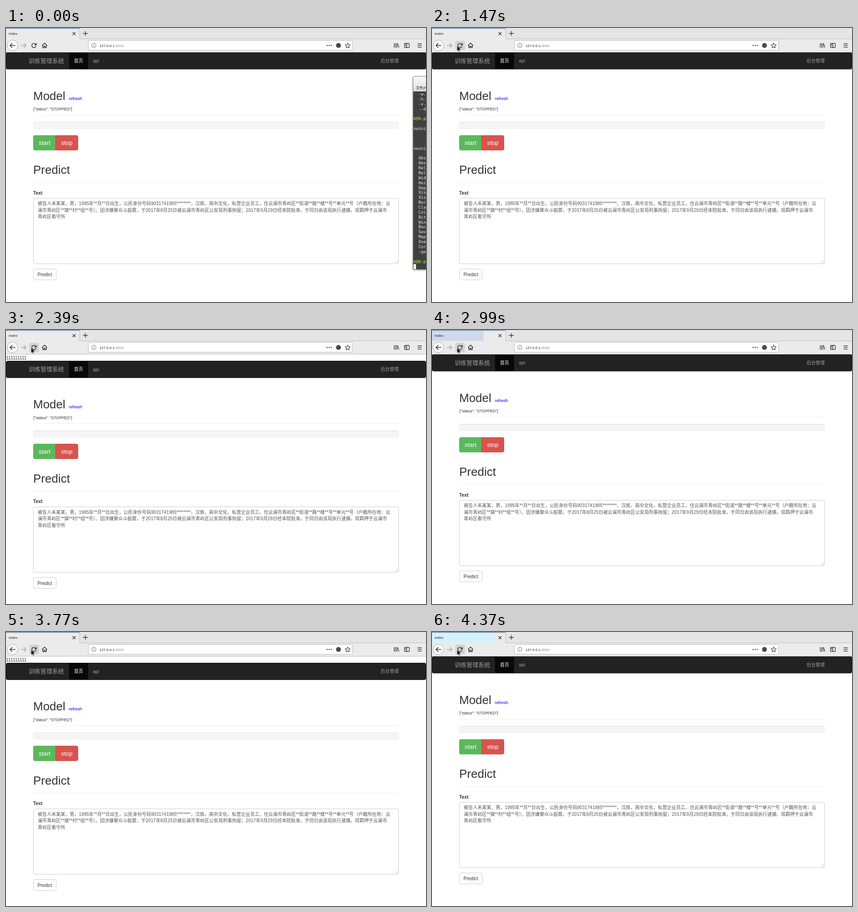
Write an HTML page that moves like this. It is 926x605 px and loops after 4.39 s.

```html
<!DOCTYPE html>
<html lang="zh">
<head>
<meta charset="utf-8">
<title>index</title>
<style>
html, body { margin: 0; width: 100%; height: 100%; overflow: hidden; background: #fff; }
svg { display: block; width: 926px; height: 605px; }
text { font-family: "Liberation Sans", "Noto Sans CJK TC", "Noto Sans CJK SC", "Noto Sans CJK", sans-serif; font-size: 10.3px; fill: #333; white-space: pre; }
.icon { fill: none; stroke: #333; stroke-width: 1.3; }
.tiny { font-size: 8px; fill: #222; }
.big { font-size: 26px; }
.nav { fill: #9d9d9d; font-size: 10px; }
.btn { fill: #fff; font-size: 13.3px; }
.body { font-size: 10.08px; fill: #555; }
.rule { fill: #eee; }
.field { fill: #fff; stroke: #ccc; }
.mono text { font: 9.05px "DejaVu Sans Mono", monospace; fill: #eee; }
.mono .prompt { fill: #9cc43c; font-weight: bold; }

#page, #terminal, #hover { animation: 4390ms step-end infinite; }
#page { animation-name: shift; }
#terminal { animation-name: vanish; }
#hover { animation-name: press; fill: transparent; }
#burst, #pointer { animation: 4390ms linear infinite; }
#burst { animation-name: burst; }
#pointer { animation-name: travel; }

@keyframes shift {
  0%, 60.4%, 86.1% { transform: none; }
  38.7%, 74.3% { transform: translateY(14.5px); }
}
@keyframes vanish { 0% { opacity: 1; } 24.4%, 100% { opacity: 0; } }
@keyframes press {
  0% { fill: transparent; }
  20.05%, 26.2%, 53.5%, 70.9%, 82.9%, 95% { fill: #d2d2d2; }
  24.4%, 51.7%, 69%, 81.1%, 94.08% { fill: #c2c2c2; }
  100% { fill: #d2d2d2; }
}
/* A wash fills the tab after each load, then fades. */
@keyframes burst {
  0%, 41.2%, 48.51%, 64.46%, 72.91%, 76.5%, 83.81%, 88.8%, 93.41%, 96.4% { width: 0; opacity: 1; fill: #ced9e9; }
  68.1%, 69% { width: 113px; opacity: 1; fill: #ced9e9; }
  43.96%, 44.9%, 70.8%, 79.27%, 80.2%, 91.1%, 99.3%, 100% { width: 135px; opacity: 1; fill: #d4f2fd; }
  48.5%, 72.9%, 83.8%, 93.4% { width: 135px; opacity: 0; fill: #d4f2fd; }
}
@keyframes travel {
  0%, 7.51% { transform: translate(3px, 157px); opacity: 0; }
  7.52% { transform: translate(3px, 157px); opacity: 1; }
  10% { transform: translate(62px, 140px); }
  12.5% { transform: translate(112px, 113px); }
  14% { transform: translate(124px, 94px); }
  16% { transform: translate(94px, 65px); }
  18.9% { transform: translate(62px, 47px); }
  20.05%, 100% { transform: translate(55.5px, 39.5px); opacity: 1; }
}
</style>
</head>
<body>
<svg viewBox="0 0 926 605">
  <defs>
    <linearGradient id="bar" x2="0" y2="1">
      <stop stop-color="#fafafa"/><stop offset="1" stop-color="#dcdcdc"/>
    </linearGradient>
    <linearGradient id="inset" x2="0" y2="1">
      <stop stop-color="#e6e6e6"/><stop offset=".16" stop-color="#f5f5f5"/>
    </linearGradient>
    <filter id="shadow" x="-40%" width="180%"><feDropShadow dx="0" dy="1" stdDeviation="2.2" flood-opacity=".55"/></filter>
  </defs>
  <rect width="926" height="605" fill="#fff"/>

  <g id="page">
    <text x="0" y="50" font-size="10.4">111111111</text>
    <rect x=".5" y="54" width="925" height="36.8" rx="3" fill="#222" stroke="#080808"/>
    <rect x="139" y="54.5" width="42" height="36" fill="#080808"/>
    <text class="nav" x="50" y="76.5" style="font-size:13px">训练管理系统</text>
    <text class="nav" x="150" y="75.8" style="fill:#fff">首页</text>
    <text class="nav" x="191.5" y="76" style="font-size:10.3px">api</text>
    <text class="nav" x="826" y="75.8">后台管理</text>

    <text class="big" x="60" y="158.5">Model</text>
    <text x="138.3" y="158.5" style="font-size:9.5px;fill:#00e">refresh</text>
    <text x="60" y="182.3" style="font-size:8.55px">{"status": "STOPPED"}</text>
    <rect class="rule" x="60" y="192" width="806" height="1"/>
    <rect x="60.3" y="207.8" width="805.4" height="14.4" rx="2.5" fill="url(#inset)" stroke="#e9e9e9" stroke-width=".7"/>

    <path d="M109.5 237.3H63.5q-3 0-3 3v26.4q0 3 3 3h46z" fill="#5cb85c" stroke="#4cae4c"/>
    <path d="M109.5 237.3h46q3 0 3 3v26.4q0 3-3 3h-46z" fill="#d9534f" stroke="#d43f3a"/>
    <text class="btn" x="72" y="258">start</text>
    <text class="btn" x="121.5" y="258">stop</text>

    <text class="big" x="60" y="322">Predict</text>
    <rect class="rule" x="60" y="341" width="806" height="1"/>
    <text x="60" y="367.5" font-weight="bold">Text</text>
    <rect class="field" x="60.5" y="376" width="805" height="144.5" rx="3"/>
    <g class="lines">
      <text class="body" x="70" y="391.2">被告人禾某某，男，1985年**月**日出生，公民身份号码9031741985********，汉族，高中文化，私营企业员工，住云澜市青屿区**街道**路**楼**号**单元**号（户籍所在地：云</text>
      <text class="body" x="70" y="405.7">澜市青屿区**镇**村**组**号）。因涉嫌聚众斗殴罪，于2017年8月25日被云澜市青屿区公安局刑事拘留；2017年9月29日经本院批准，于同日由该局执行逮捕，现羁押于云澜市</text>
      <text class="body" x="70" y="420.2">青屿区看守所</text>
    </g>
    <path d="M858 519l6-6M861.5 519l2.5-2.5" stroke="#aaa" stroke-width=".8"/>
    <rect class="field" x="60.5" y="532" width="50" height="24" rx="3"/>
    <text x="69.5" y="548">Predict</text>
  </g>

  <g id="terminal">
    <path d="M897.5 533V111q0-4 4-4H940v426z" fill="#3f3f3f" filter="url(#shadow)"/>
    <path d="M897.5 140V111q0-4 4-4H940v33z" fill="url(#bar)"/>
    <path d="M897.5 533V111q0-4 4-4H940M897.5 533H940" fill="none" stroke="#777" stroke-width=".8"/>
    <text class="tiny" x="904" y="135" style="font-size:7.6px">文件(F)</text>
    <g class="mono" id="log"></g>
    <rect x="898.5" y="521.5" width="5.5" height="11" fill="#fff"/>
  </g>

  <g id="chrome">
    <rect width="926" height="53.5" fill="#ebebeb"/>
    <rect x="162" width="764" height="24" fill="#e5e5e5"/>
    <rect id="burst" y="1.5" width="0" height="22.5"/>
    <rect width="162" height="1.6" fill="#7890b0"/>
    <path d="M162.5 0V24H926M0 53.5H926" fill="none" stroke="#bdbdbd"/>
    <text class="tiny" x="6" y="15">index</text>
    <path class="icon" d="M146.8 9.2l6.6 6.6m0-6.6l-6.6 6.6M169.8 12h10.4M175 6.8v10.4"/>

    <circle cx="14.3" cy="38.5" r="11.7" fill="#fafafa" stroke="#aaa"/>
    <path class="icon" d="M20.5 38.5H9M13.8 33.5l-5 5 5 5" style="stroke-width:1.6"/>
    <path class="icon" d="M33 38.5H44M39.3 33.5l5 5-5 5" style="stroke:#a5a5a5"/>
    <rect id="hover" x="51.5" y="28.5" width="21" height="20.5" rx="2"/>
    <path class="icon" d="M65.2 35.6A4.7 4.7 0 1 0 66 40.3" style="stroke-width:1.6"/>
    <path d="M67.6 33v5.2h-5.2z" fill="#333"/>
    <path class="icon" d="M79.3 38.8L85 33.3l5.7 5.5M81.2 38v5.4h2.6v-3.2h2.4v3.2h2.6V38" style="stroke-width:1.5"/>

    <rect x="181.5" y="27.5" width="582.5" height="21.5" rx="1.5" fill="#fff" stroke="#bbb"/>
    <circle class="icon" cx="193.7" cy="38.5" r="4.8" style="stroke:#666;stroke-width:1"/>
    <path d="M193.7 37.8v3.2M193.7 35.7v1.1" stroke="#666" stroke-width="1.1"/>
    <text class="tiny" x="206" y="41.5">127.0.0.1<tspan fill="#8a8a8a">:9000</tspan></text>
    <g fill="#4a4a4a">
      <circle cx="708" cy="38.6" r="1.4"/><circle cx="712.6" cy="38.6" r="1.4"/><circle cx="717.2" cy="38.6" r="1.4"/>
      <circle cx="733" cy="38.5" r="5.4"/>
    </g>
    <path class="icon" d="M753.3 33.2l1.7 3.5 3.8.5-2.8 2.7.7 3.8-3.4-1.8-3.4 1.8.7-3.8-2.8-2.7 3.8-.5z" style="stroke-width:1.1"/>
    <path class="icon" d="M856 33.5v10M859 33.5v10M862 33.5v10M863.4 34l3 9.3"/>
    <rect class="icon" x="878.6" y="34" width="10.6" height="9" rx="1.3"/>
    <path class="icon" d="M883.5 34v9M880 36.5h2M880 38.6h2M907.5 35h9M907.5 38.7h9M907.5 42.4h9"/>
  </g>

  <path id="pointer" d="M0 0V11.5L2.7 9l1.8 4.1 2-.9-1.8-3.9H8.4z" stroke="#fff" stroke-width=".6"/>
</svg>
<script>
const log = document.getElementById("log");
const fields = "Abs Abs Rel Rel Wid Hei Dep Vis Vis Bor Cla Col Bit Win Bac Sav Map Ove Cor -ge".split(" ");

function line(row, str, indent = 0, cls = "") {
  const text = document.createElementNS("http://www.w3.org/2000/svg", "text");
  text.setAttribute("x", 898.5 + indent * 5.45);
  text.setAttribute("y", 149 + row * 10.87);
  text.setAttribute("class", cls);
  text.textContent = str;
  log.append(text);
}

["-w.", "-h.", "-v.", "--d"].forEach((s, i) => line(i, s, 2));
[5, 34].forEach(row => line(row, "k@k-p", 0, "prompt"));
[7, 11].forEach(row => line(row, "xwini"));
fields.forEach((s, i) => line(13 + i, s, 2));
</script>
</body>
</html>
```
